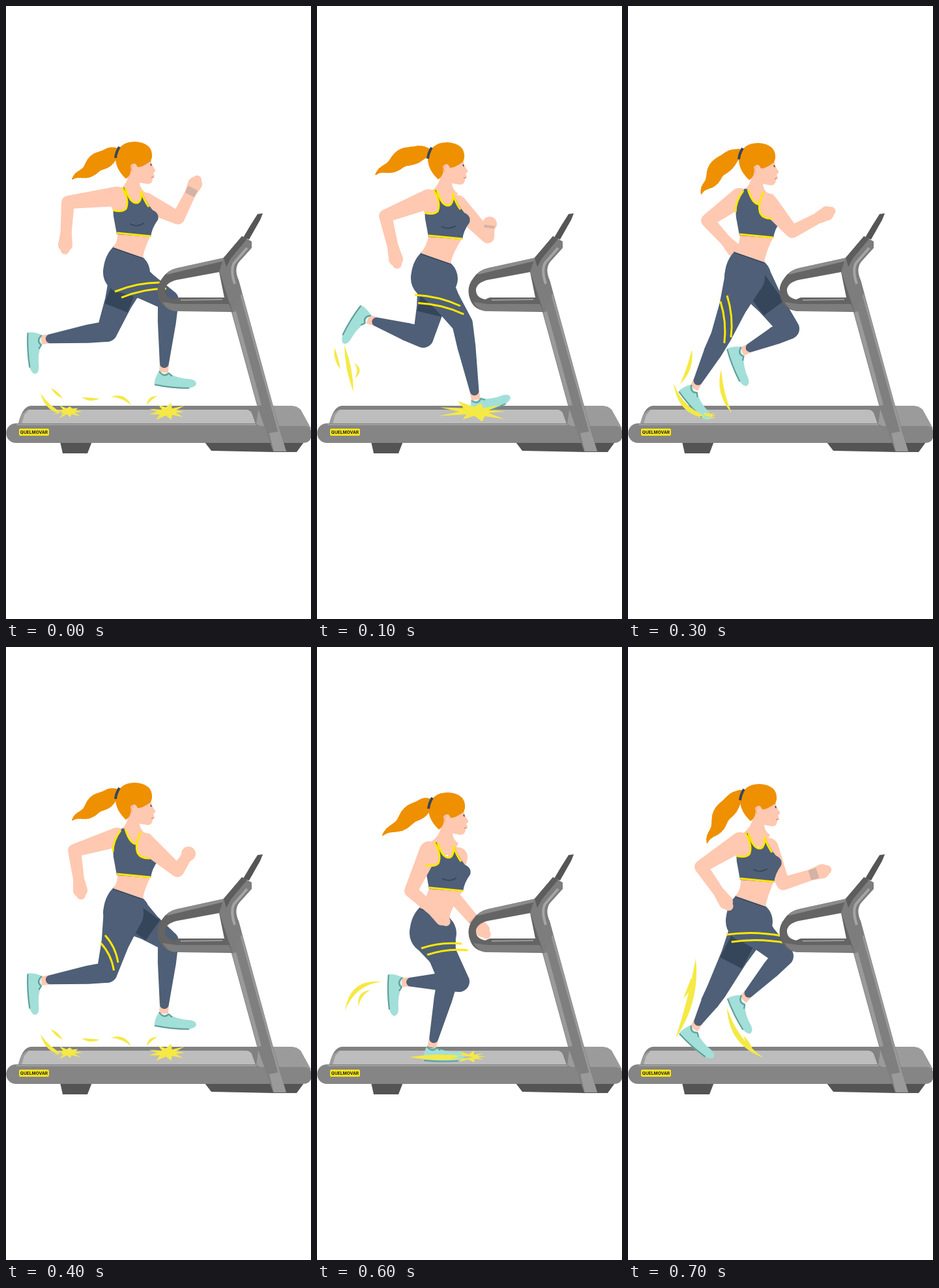
An HTML page that plays this animation: 468x940 px, repeating every 0.8 s.

```html
<!DOCTYPE html>
<html lang="en">
<head>
<meta charset="utf-8">
<title>Treadmill run</title>
<style>
html, body { margin: 0; width: 100%; height: 100%; overflow: hidden; background: #fff; }
svg { display: block; width: 100%; height: 100%; }
.pose { opacity: 0; }
text { font: 700 6.6px Inter, Arial, sans-serif; }
</style>
</head>
<body>
<svg viewBox="0 0 468 940" fill="none" stroke-linejoin="round">
  <g id="base">
    <path fill="#545454" d="M83 668H132L125 686H87ZM305 669H457L446 684H410L315 682Z"/>
    <path fill="#818181" d="M18 645Q24 614 38 613H436Q446 613 452 619L468 648Z"/>
    <path fill="#bdbdbd" d="M19 641Q24 622 35 619H368Q374 619 377 624L383 641Z"/>
    <path fill="#9c9c9c" d="M19 641Q22 622 35 619L28 627L24 641Z"/>
    <path fill="#9b9b9b" d="M384 641L388 613H436Q446 613 452 619L468 648H388Z"/>
    <path fill="#858585" d="M16 640H383L390 644H460Q469 646 469 657Q468 670 456 670H16C-5 670 -5 640 16 640Z"/>
    <path stroke="#9f9f9f" stroke-width="2" d="M16 642H384"/>
    <rect x="20" y="648" width="46" height="11" rx="2" fill="#f7e41c"/>
    <text x="43" y="656" text-anchor="middle" fill="#222">QUELMOVAR</text>
  </g>
  <g id="runner"></g>
  <g id="front">
    <path fill="#7f7f7f" d="M345 466L352 412L357 420L408 606L430 683H410L385 612Z"/>
    <path fill="#9a9a9a" d="M347 470L353 468L392 612L386 613Z"/>
    <path stroke="#999" stroke-width="3" d="M359 436L407 610L427 681"/>
    <path fill="#9a9a9a" d="M404 655L420 652L430 683H411Z"/>
    <path fill="#555" d="M364 355L374 338L386 319L394 318L390 328L373 358Z"/>
    <path fill="#646464" fill-rule="evenodd" d="M335 386L262 402Q248 405 240 417Q228 432 235 450Q241 467 262 468L347 469L352 440L340 400ZM327 408L262 420Q246 424 244 434Q243 447 258 450Q262 448 265 447H335Z"/>
    <path fill="#7d7d7d" d="M240 454Q248 468 262 468H347L342 457H262Z"/>
    <path fill="#8b8b8b" d="M335 386L262 402Q250 405 246 412L334 391Z"/>
    <path stroke="#999" stroke-width="2" d="M268 451L332 450"/>
    <path fill="#7d7d7d" d="M334 386L362 353L377 361V371L358 392Q350 402 356 418L362 440L348 470L338 440Q332 420 327 408Z"/>
    <path fill="#5d5d5d" d="M334 386L362 353L370 357L345 387L338 400Z"/>
    <path stroke="#a5a5a5" stroke-width="4" d="M370 371L350 394Q344 405 351 426"/>
  </g>
</svg>
<script>
const STEP = 100;
const C = {
  skin: '#ffc8b1', navy: '#4e5f77', dark: '#35465b', hair: '#ee9000',
  trim: '#ffe700', splash: '#f5e945', shoe: '#a3dfd9', sole: '#5f9f99', watch: '#d3b3a5'
};

function add(parent, tag, attrs) {
  const el = document.createElementNS('http://www.w3.org/2000/svg', tag);
  for (const key in attrs) el.setAttribute(key, attrs[key]);
  return parent.appendChild(el);
}
const fill = (g, color, d) => add(g, 'path', { d, fill: color });
const line = (g, color, width, d) => add(g, 'path', { d, stroke: color, 'stroke-width': width });
const shift = (g, [x, y]) => add(g, 'g', { transform: `translate(${x} ${y})` });
const plus = (a, b) => [a[0] + b[0], a[1] + b[1]];
const mix = (a, b, t) => [a[0] + (b[0] - a[0]) * t, a[1] + (b[1] - a[1]) * t];
const dist = (a, b) => Math.hypot(b[0] - a[0], b[1] - a[1]);
const normal = (a, b) => [(a[1] - b[1]) / dist(a, b), (b[0] - a[0]) / dist(a, b)];
// The point at share t from a to b, pushed sideways by n.
const beside = (a, b, t, n) => plus(mix(a, b, t), normal(a, b).map(v => v * n));

// Outline of circles [point, radius] joined by tapered bars.
function chain(links) {
  return links.map(([p, r], i) => {
    let d = `M${p[0] - r} ${p[1]}a${r} ${r} 0 1 0 ${2 * r} 0a${r} ${r} 0 1 0 ${-2 * r} 0Z`;
    if (i) {
      const [q, s] = links[i - 1];
      d += `M${beside(q, p, 0, s)}L${beside(q, p, 1, r)}L${beside(q, p, 1, -r)}L${beside(q, p, 0, -s)}Z`;
    }
    return d;
  }).join('');
}

function arm(g, shoulder, [elbow, hand]) {
  fill(g, C.skin, chain([
    [shoulder, 15], [elbow, 10], [mix(elbow, hand, .7), 8.5], [hand, 11], [mix(elbow, hand, 1.12), 7]
  ]));
}

function leg(g, hip, [knee, ankle, turn], shadow) {
  const end = mix(ankle, knee, 14 / dist(ankle, knee));
  line(g, C.skin, 14, `M${end}L${ankle}`);
  const shoe = add(g, 'g', { transform: `translate(${ankle}) rotate(${turn}) scale(.87) translate(-16 -2)` });
  fill(shoe, C.shoe, 'M8 -1Q0 12 0 24Q24 29 48 29Q70 29 74 21Q75 14 64 12Q40 12 23 2Q16 7 8 -1Z');
  line(shoe, C.sole, 2.5, 'M1 24Q30 29 62 28M8 0Q16 12 25 3L31 8');
  fill(g, C.navy, chain([
    [hip, 31], [mix(hip, knee, .52), 21], [knee, 16], [mix(knee, end, .35), 14], [end, 7]
  ]));
  if (shadow) line(g, C.dark, 38, `M${hip}L${mix(hip, knee, shadow)}`);
}

function pelvis(g, waist, hip) {
  const left = plus(waist, [-23, -8]), right = plus(waist, [23, 8]);
  fill(g, C.navy, `M${left}L${right}L${plus(hip, [31, 0])}H${hip[0] - 31}Q${plus(left, [-14, 14])} ${left}Z`);
  line(g, C.dark, 3, `M${left}L${right}`);
}

function stripes(g, [a, b]) {
  const along = [normal(a, b)[1], -normal(a, b)[0]].map(v => v * 8);
  for (const k of [0, 1]) {
    const move = p => plus(p, plus(along, beside(a, b, 0, 11).map((v, i) => v - a[i])).map(v => v * k));
    line(g, C.trim, 3, `M${move(a)}Q${move(beside(a, b, .5, -7))} ${move(b)}`);
  }
}

function torso(g, at, waist, leftNear) {
  const hemL = plus(at, [171, 346]), hemR = plus(at, [222, 352]);
  const left = plus(waist, [-23, -8]), right = plus(waist, [23, 8]);
  fill(g, C.skin, `M${hemL}L${hemR}Q${plus(right, [2, -14])} ${right}L${left}Q${plus(left, [9, -10])} ${hemL}Z`);
  const s = shift(g, at);
  fill(s, C.navy, 'M178 278Q160 305 166 328L170 350L222 354Q224 340 233 328Q236 318 225 313Q214 300 208 283Q208 303 199 302Q190 300 183 279Z');
  line(s, C.trim, 3, 'M183 279Q190 302 200 302Q208 302 208 283M170 348L222 353');
  line(s, C.trim, 3, leftNear ? 'M207 284Q212 298 219 308' : 'M176 281Q164 297 164 314');
  if (leftNear) line(s, C.dark, 1.5, 'M190 334Q200 340 212 333');
}

// The near shoulder lies over the top, edged by its trim.
function sleeve(g, at, leftNear) {
  const s = shift(g, at);
  const edge = leftNear ? 'M178 278Q190 298 184 311Q178 317 164 313' : 'M207 283Q197 303 202 316Q207 325 221 324';
  fill(s, C.skin, edge + (leftNear ? 'L158 300L166 278Z' : 'L229 307L222 287Z'));
  line(s, C.trim, 3, edge);
}

function head(g, at, [mid, tip]) {
  const root = plus(at, [168, 224]);
  const bend = [0, 1].map(i => 2 * mid[i] - (root[i] + tip[i]) / 2);
  const links = Array.from({ length: 25 }, (_, i) => {
    const t = i / 24;
    const p = mix(mix(root, bend, t), mix(bend, tip, t), t);
    const wave = 3 * Math.sin(t * 15) * t;
    return [beside(p, plus(p, [tip[0] - root[0], tip[1] - root[1]]), 0, wave), 1 + 6 * (1 - t) + 10 * Math.sin(Math.PI * t)];
  });
  fill(g, C.hair, chain(links));
  const s = shift(g, at);
  fill(s, C.skin, 'M188 240L222 234Q224 246 229 251Q230 254 226 256L228 261L225 264Q225 273 217 273L206 271L190 264Z');
  fill(s, C.hair, 'M168 233Q172 208 198 208Q226 210 224 232L222 238Q208 248 202 247Q198 237 191 245Q194 258 184 265Q168 250 168 233Z');
  line(s, C.dark, 4, 'M168 233Q169 224 174 216');
  line(s, '#e8a48e', 1, 'M196 244Q190 246 194 254');
  line(s, C.dark, 1.6, 'M222 242L223 245');
  line(s, '#d9705f', 1.2, 'M223 263L227 262');
}

function random(seed) {
  return () => (seed = seed * 16807 % 2147483647) / 2147483647;
}

// A flat star of splashed drops.
function burst([x, y], w, h) {
  const rnd = random(x * y), n = 18;
  return 'M' + Array.from({ length: n }, (_, i) => {
    const a = i / n * 2 * Math.PI, r = i % 2 ? .3 + .15 * rnd() : .65 + .35 * rnd();
    return [x + w * r * Math.cos(a), y + h * r * Math.sin(a)].map(v => v.toFixed(1));
  }).join('L') + 'Z';
}

// A curved lick with two sharp ends.
function lick([a, b, bend]) {
  const fat = 3 + dist(a, b) * .05;
  return `M${a}Q${beside(a, b, .5, bend + fat)} ${b}Q${beside(a, b, .5, bend - fat)} ${a}Z`;
}

// Legs: knee, ankle, turn of the foot. Arms: elbow, hand.
const fly = {
  head: [0, 0], chest: [0, 0], waist: [187, 378], leftNear: true,
  tail: [[142, 240], [103, 267]],
  nearArm: [[95, 301], [91, 366]], farArm: [[264, 325], [290, 273]],
  near: [[249, 451], [242, 562], 2], far: [[155, 499], [54, 512], 83],
  band: [[167, 438], [236, 424]],
  bursts: [[[95, 622], 28, 12], [[248, 622], 36, 15]],
  licks: [[[53, 594], [90, 626], 12], [[69, 586], [87, 602], 0], [[116, 600], [144, 602], 4], [[161, 599], [192, 612], -10], [[232, 598], [216, 612], 6]]
};
const land = {
  head: [2, 1], chest: [1, 4], waist: [182, 387], leftNear: true,
  tail: [[135, 233], [91, 260]],
  nearArm: [[105, 322], [121, 388]], farArm: [[262, 354], [265, 334]],
  near: [[223, 487], [244, 604], -22], far: [[163, 508], [78, 480], 118],
  band: [[150, 443], [220, 460]],
  bursts: [[[245, 622], 62, 20]],
  licks: [[[42, 520], [56, 592], 0], [[27, 524], [36, 557], 3], [[57, 547], [58, 571], -12]]
};
const stand = {
  head: [3, 15], chest: [2, 21], waist: [180, 408], leftNear: true,
  tail: [[147, 256], [102, 290]],
  nearArm: [[144, 374], [192, 416]], farArm: [[207, 380], [254, 434]],
  near: [[201, 508], [176, 614], -3], far: [[218, 513], [130, 514], 85],
  band: [[152, 459], [217, 487]],
  bursts: [[[235, 628], 36, 10]],
  licks: [[[142, 629], [240, 629], 0], [[43, 558], [99, 513], -28], [[64, 551], [82, 526], -12]]
};
const push = {
  head: [2, 2], chest: [1, 2], waist: [186, 385], leftNear: false,
  tail: [[140, 249], [114, 289]],
  nearArm: [[252, 346], [305, 318]], farArm: [[122, 329], [162, 373]],
  near: [[143, 506], [101, 587], 45], far: [[247, 495], [175, 530], 65],
  band: [[152, 444], [158, 508]],
  bursts: [[[122, 628], 16, 7]],
  licks: [[[70, 578], [135, 632], 32], [[80, 580], [98, 527], 8], [[143, 557], [159, 624], 12]]
};
const landFar = {
  head: [3, 2], chest: [4, 2], waist: [190, 396], leftNear: false,
  tail: [[128, 229], [78, 239]],
  nearArm: [[263, 343], [280, 317]], farArm: [[105, 312], [114, 373]],
  near: [[167, 509], [89, 467], 130], far: [[234, 505], [262, 600], -23],
  band: [[157, 448], [185, 497]],
  bursts: [[[262, 630], 16, 7]],
  licks: [[[29, 528], [71, 452], -16], [[29, 530], [34, 541], 2], [[226, 578], [270, 632], 16]]
};
const pushFar = {
  head: [4, 2], chest: [2, 7], waist: [188, 390], leftNear: true,
  tail: [[147, 255], [123, 301]],
  nearArm: [[112, 337], [150, 391]], farArm: [[238, 363], [298, 344]],
  near: [[238, 474], [176, 541], 60], far: [[136, 527], [101, 586], 38],
  band: [[151, 441], [236, 443]],
  bursts: [],
  licks: [[[104, 477], [73, 600], -14], [[97, 507], [85, 538], -5], [[152, 553], [208, 630], 24], [[177, 596], [192, 620], 0]]
};

// The second half of the stride swaps the legs.
const swap = (pose, more) => ({ ...pose, near: pose.far, far: pose.near, ...more });
const { nearArm, farArm, leftNear } = landFar;
const flyFar = swap(fly, { nearArm, farArm, leftNear, band: [[152, 442], [172, 484]] });
const standFar = swap(stand, { band: [[160, 462], [222, 455]] });

function build(pose) {
  const { head: top, chest, waist, leftNear } = pose;
  const g = add(document.getElementById('runner'), 'g', { class: 'pose' });
  const hip = plus(waist, [-7, 31]);
  const sides = [plus(chest, [170, 292]), plus(chest, [214, 301])];
  const [nearSide, farSide] = leftNear ? sides : sides.reverse();

  arm(g, farSide, pose.farArm);
  if (leftNear) line(g, C.watch, 16, `M${mix(...pose.farArm, .68)}L${mix(...pose.farArm, .88)}`);
  fill(shift(g, top), C.skin, 'M188 258Q186 274 172 284L178 304H205L214 286Q204 280 205 266Z');
  const spread = Math.abs(pose.near[0][0] - pose.far[0][0]);
  leg(g, plus(hip, [10, 0]), pose.far, Math.min(.6, spread / 100));
  leg(g, hip, pose.near);
  pelvis(g, waist, hip);
  stripes(g, pose.band);
  torso(g, chest, waist, leftNear);
  arm(g, nearSide, pose.nearArm);
  sleeve(g, chest, leftNear);
  head(g, top, pose.tail);
  fill(g, C.splash, pose.bursts.map(b => burst(...b)).join('') + pose.licks.map(lick).join(''));
  return g;
}

const cycle = [fly, land, stand, push, flyFar, landFar, standFar, pushFar];
const share = 1 / cycle.length;

cycle.map(build).forEach((g, i) => g.animate([
  { opacity: 1, offset: 0 }, { opacity: 1, offset: share },
  { opacity: 0, offset: share }, { opacity: 0, offset: 1 }
], { duration: STEP * cycle.length, iterations: Infinity, iterationStart: (cycle.length - i) % cycle.length * share }));
</script>
</body>
</html>
```
